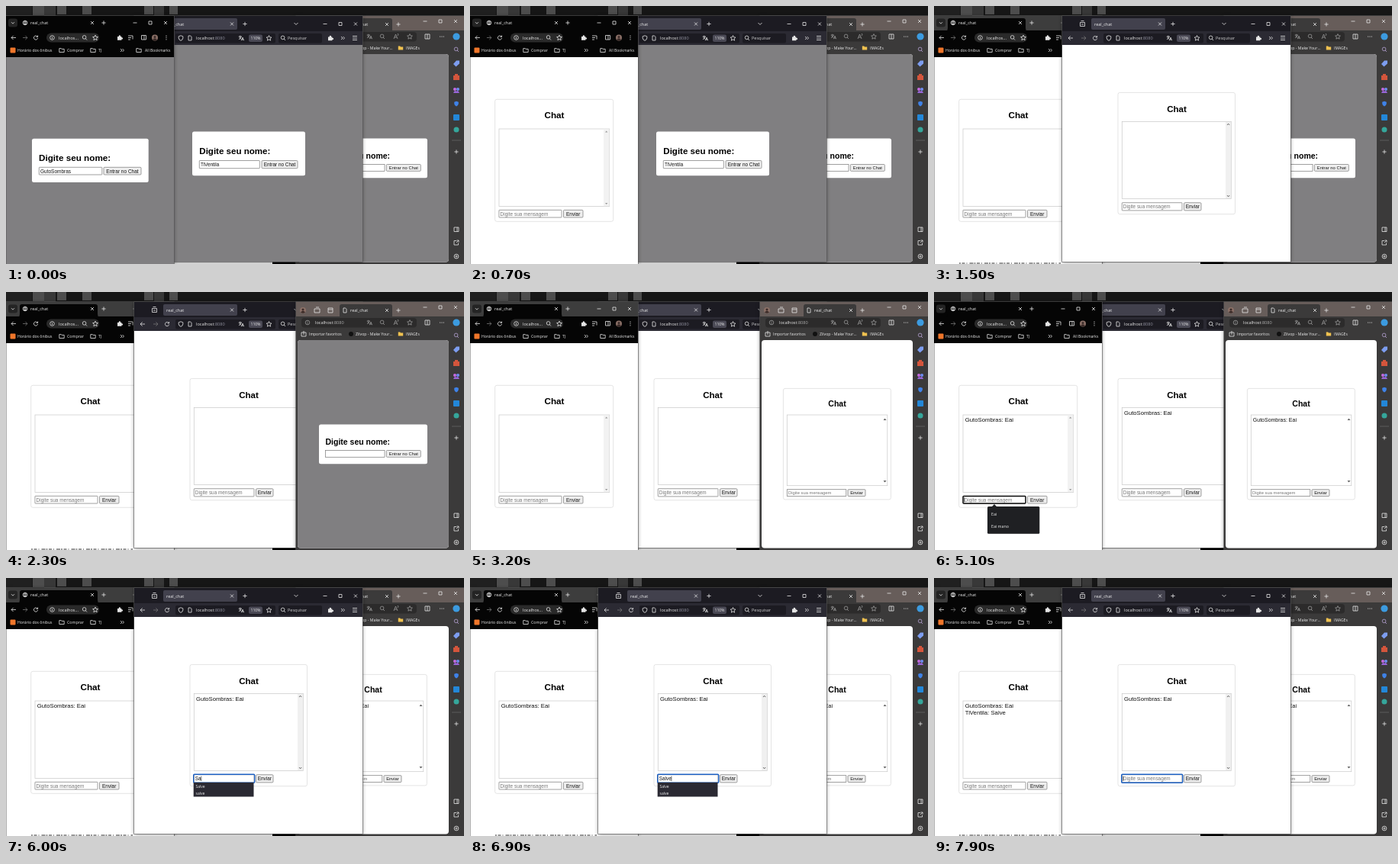
An HTML page for the animation above (8 s loop, 600x338 px).

```html
<!DOCTYPE html>
<html lang="pt-BR">
<head>
<meta charset="utf-8">
<title>real_chat</title>
<style>
html, body { margin: 0; width: 100%; height: 100%; overflow: hidden; background: #161616; }
svg { position: absolute; display: block; }
text { font: 5.3px "Open Sans", "Noto Sans", sans-serif; fill: #eee; white-space: pre; }

/* moving parts share one clock */
.win, .t { animation: 8s step-end -30ms infinite; }
.win { box-shadow: 0 0 0 .6px #555, 0 1px 5px rgba(0, 0, 0, .45); }
#chrome { animation-name: z-chrome; }
#firefox { animation-name: z-firefox; }
#edge { animation-name: z-edge; }

.i { fill: none; stroke: #e6e6e6; stroke-width: .8; }
.dim { stroke: #9a9a9a; }
.page text { font-family: "Liberation Sans", Arial, sans-serif; fill: #111; }
.page .h { font-weight: bold; fill: #000; }
.page .ph { fill: #777; }
.page .mid { text-anchor: middle; }
.card { fill: #fff; stroke: #d9d9d9; stroke-width: .7; }
.box { fill: #fff; stroke: #c8c8c8; stroke-width: .7; }
.in { fill: #fff; stroke: #777; stroke-width: .7; }
.btn { fill: #efefef; stroke: #777; stroke-width: .7; }
.ring { fill: none; stroke: #111; stroke-width: 1.4; }
.veil { fill: #807f81; }
.page .menu text { font: 5.3px "Open Sans", "Noto Sans", sans-serif; fill: #eee; }

#chrome .h { font-size: 11.7px; }  #chrome .m { font-size: 7.75px; }  #chrome .f { font-size: 6.5px; }
#firefox .h { font-size: 11.55px; } #firefox .m { font-size: 7.65px; } #firefox .f { font-size: 6.4px; }
#edge .h { font-size: 10.5px; }    #edge .m { font-size: 7px; }       #edge .f { font-size: 5.83px; }

@keyframes z-chrome  { 0% { z-index: 3 } 12.5% { z-index: 2 } 22.5% { z-index: 1 } 38.75% { z-index: 3 } 68.75% { z-index: 2 } }
@keyframes z-firefox { 0% { z-index: 2 } 12.5% { z-index: 3 } 22.5% { z-index: 2 } 38.75% { z-index: 1 } 68.75% { z-index: 3 } }
@keyframes z-edge    { 0% { z-index: 1 } 22.5% { z-index: 3 } 38.75% { z-index: 2 } 68.75% { z-index: 1 } }

@keyframes idle   { 0% { opacity: 0 } 12.5% { opacity: 1 } 42.5% { opacity: 0 } 68.75% { opacity: 1 } }
@keyframes behind { 0% { opacity: 0 } 12.5% { opacity: 1 } 38.75% { opacity: 0 } 68.75% { opacity: 1 } }
@keyframes join1  { 0% { opacity: 1 } 8.75% { opacity: 0 } }
@keyframes join2  { 0% { opacity: 1 } 17.5% { opacity: 0 } }
@keyframes join3  { 0% { opacity: 1 } 30% { opacity: 0 } }
@keyframes msg1   { 0% { opacity: 0 } 56.25% { opacity: 1 } }
@keyframes msg2   { 0% { opacity: 0 } 98.75% { opacity: 1 } }

@keyframes focus1 { 0% { opacity: 0 } 47.5% { opacity: 1 } 68.75% { opacity: 0 } }
@keyframes hint1  { 0% { opacity: 1 } 50% { opacity: 0 } 56.25% { opacity: 1 } }
@keyframes eai1   { 0% { opacity: 0 } 50% { opacity: 1 } 56.25% { opacity: 0 } }
@keyframes eai2   { 0% { opacity: 0 } 51.25% { opacity: 1 } 56.25% { opacity: 0 } }
@keyframes eai3   { 0% { opacity: 0 } 53.75% { opacity: 1 } 56.25% { opacity: 0 } }
@keyframes caret1 { 0% { transform: none } 50% { transform: translateX(4.4px) } 51.25% { transform: translateX(8px) }
                    53.75% { transform: translateX(9.4px) } 56.25% { transform: none } }

@keyframes focus2 { 0% { opacity: 0 } 71.25% { opacity: 1 } }
@keyframes hint2  { 0% { opacity: 1 } 73.75% { opacity: 0 } 98.75% { opacity: 1 } }
@keyframes typed2 { 0% { opacity: 0 } 73.75% { opacity: 1 } 98.75% { opacity: 0 } }
@keyframes sal2   { 0% { opacity: 0 } 75% { opacity: 1 } }
@keyframes sal3   { 0% { opacity: 0 } 78.75% { opacity: 1 } }
@keyframes sal4   { 0% { opacity: 0 } 81.25% { opacity: 1 } }
@keyframes sal5   { 0% { opacity: 0 } 85% { opacity: 1 } }
@keyframes caret2 { 0% { transform: none } 73.75% { transform: translateX(4.3px) } 75% { transform: translateX(7.8px) }
                    78.75% { transform: translateX(9.3px) } 81.25% { transform: translateX(12.4px) }
                    85% { transform: translateX(16px) } 98.75% { transform: none } }
</style>
</head>
<body>

<!-- desktop and shared icons -->
<svg width="600" height="338" viewBox="0 0 600 338">
  <defs>
    <path id="x" d="M-2-2 2 2M2-2-2 2"/>
    <path id="plus" d="M-2.6 0H2.6M0-2.6V2.6"/>
    <path id="ctl" d="M-2.5 0H2.5M18-2H22V2H18ZM38-2 42 2M42-2 38 2"/>
    <path id="back" d="M3 0H-3M-.4-2.6-3 0-.4 2.6"/>
    <path id="fwd" d="M-3 0H3M.4-2.6 3 0 .4 2.6"/>
    <path id="load" d="M2.3-1.2A2.6 2.6 0 1 0 2.6 .5M2.6-3V-1H.6"/>
    <path id="star" d="M0-3.4 1-1.1 3.4-.9 1.6 .8 2.1 3.2 0 1.9-2.1 3.2-1.6 .8-3.4-.9-1-1.1Z"/>
    <path id="lens" d="M1.9-.6A2.3 2.3 0 1 1-2.7-.6 2.3 2.3 0 1 1 1.9-.6ZM1.2 1.1 3 3"/>
    <path id="doc" d="M-2-3H.7L2-1.6V3H-2Z"/>
    <path id="info" d="M2.8 0A2.8 2.8 0 1 1-2.8 0 2.8 2.8 0 1 1 2.8 0ZM0-.4V1.6M0-1.7V-1"/>
    <path id="more" d="M-.6 0A.6 .6 0 1 1 .6 0 .6 .6 0 1 1-.6 0M-.6-2.3A.6 .6 0 1 1 .6-2.3 .6 .6 0 1 1-.6-2.3M-.6 2.3A.6 .6 0 1 1 .6 2.3 .6 .6 0 1 1-.6 2.3"/>
    <path id="puzzle" d="M-3-1.6H-1.2A1.2 1.2 0 1 1 1-1.6H2.4V0A1.1 1.1 0 1 1 2.4 1.8V3.2H-3Z"/>
    <path id="folder" d="M-3.2-2.4H-.8L0-1.6H3.2V2.5H-3.2Z"/>
    <path id="shield" d="M0-3.2 2.8-2.2V0Q2.6 2.4 0 3.4-2.6 2.4-2.8 0V-2.2Z"/>
    <g id="face"><circle r="4" fill="#8a6f66"/><circle cy="-.9" r="1.5" fill="#3a2b28"/><path d="M-3 2.6Q0-1 3 2.6Q0 5 -3 2.6Z" fill="#3a2b28"/></g>
    <g id="lang"><path d="M-3.2-2H.8M-1.2-3.2V-2M.2-2Q-.6 .8-3 1.8M-2.4-1.4Q-1.4 .6 .2 1.4M.4 3.2 2 -.8 3.6 3.2M1 2H3"/></g>
  </defs>
  <path fill="#161616" d="M0 0H600V338H0Z"/>
  <path fill="#202020" d="M0 0H34V13H0Z"/>
  <path fill="#4d4d4d" d="M35 0H50V12H35ZM67 0H79V11H67ZM100 0H112V11H100ZM181 0H193V11H181ZM214 0H225V11H214Z"/>
  <path fill="#383838" d="M50 0H65V13H50ZM194 0H207V13H194Z"/>
  <path fill="#f4f4f4" d="M0 334H349V338H0Z"/>
  <path fill="#000" d="M349 334H380V338H349Z"/>
</svg>

<svg id="edge" class="win" style="left:380px;top:13px" width="220" height="325" viewBox="380 13 220 325">
  <path fill="#3b3a3a" d="M380 13H600V338H380Z"/>
  <path fill="#675d5a" d="M380 13H600V32H380Z"/>
  <path fill="#3b3a3a" d="M437 32V19Q437 16 440 16H503Q506 16 506 19V32Z"/>
  <use href="#face" x="389" y="24"/>
  <g class="i">
    <path d="M404 22H411V27H404ZM406 20H410M422 21H428V27H422ZM422 23H428"/>
    <use href="#doc" x="444" y="24"/>
    <use href="#x" x="499" y="24"/><use href="#plus" x="514" y="24"/><use href="#ctl" x="549" y="20"/>
  </g>
  <text x="451" y="26" style="font-size:5.5px">real_chat</text>
  <rect x="387" y="34" width="151" height="12.5" rx="4" fill="#2c2b2b"/>
  <g class="i dim">
    <use href="#info" x="395" y="40"/><use href="#lang" x="476" y="40"/><use href="#lens" x="493" y="40"/>
    <path d="M508 43 510.5 37 513 43M509 41H512M513 36Q515 37 513 39"/>
    <use href="#star" x="529" y="40"/>
  </g>
  <text x="405" y="42" style="font-size:5.6px">localhost<tspan fill="#aaa">:8080</tspan></text>
  <path class="i" d="M549 37H555V43H549ZM552 37V43"/>
  <use href="#more" fill="#eee" transform="translate(571 40) rotate(90)"/>
  <circle cx="590" cy="40" r="4.6" fill="#3c9be0"/>
  <path class="i" d="M387 53H393V58H387ZM390 51V56"/>
  <text x="397" y="57" style="font-size:5px">Importar favoritos</text>
  <circle cx="452" cy="55" r="3" fill="#111"/>
  <text x="458" y="57" style="font-size:5.2px">Zilvop - Make Your...</text>
  <use href="#folder" x="517" y="55" fill="#f0c250"/>
  <text x="524" y="57" style="font-size:5px">IMAGEs</text>

  <g class="i">
    <use href="#lens" x="590" y="57" stroke="#b9a5d8"/><path d="M584 176H596" stroke="#666"/>
    <use href="#plus" x="590" y="191"/>
    <path d="M587 290H593V295.500H587ZM591 290V295.500M590 307.500H587V313H592.500V310.500M590 310 593 307M590.500 307H593V309.500"/>
    <circle cx="590" cy="328" r="2.900"/><circle cx="590" cy="328" r="1"/>
  </g>
  <path fill="#7d9df0" d="M586 76 590 71.500H594V75.500L589.500 79.500Z"/>
  <path fill="#d4553c" d="M586 91H594V97H586ZM588 89H592V91H588Z"/>
  <circle cx="588" cy="109" r="2" fill="#c46be0"/><circle cx="592" cy="109" r="2" fill="#6c8cf0"/><path fill="#9966d8" d="M586 114Q588 109 590 112Q592 109 594 114Z"/>
  <use href="#shield" x="590" y="128" fill="#3f82e8"/>
  <rect x="586" y="142" width="8" height="8" rx="1" fill="#2387d8"/>
  <circle cx="590" cy="162" r="3.5" fill="#35a69b"/>

  <g class="page">
    <rect x="382" y="63" width="198" height="272.500" rx="4" fill="#fff"/>
    <rect class="card" x="410.400" y="126.400" width="141" height="145.500" rx="2.500"/>
    <text class="h mid" x="481" y="150">Chat</text>
    <rect class="box" x="415.300" y="161" width="131.500" height="92.700"/>
    <path fill="#666" d="M541.500 168 543.500 165.500 545.500 168ZM541.500 247 543.500 249.500 545.500 247Z"/>
    <text class="m t" x="417.800" y="169.600" style="animation-name:msg1">GutoSombras: Eai</text>
    <rect class="in" x="415.300" y="258.700" width="77.500" height="8.800"/>
    <text class="f ph" x="417" y="265.200">Digite sua mensagem</text>
    <rect class="btn" x="495" y="258.700" width="23" height="8.800" rx="1"/>
    <text class="f mid" x="506.500" y="265.200">Enviar</text>
    <g class="t" style="animation-name:join3">
      <rect class="veil" x="382" y="63" width="198" height="272.500" rx="4"/>
      <rect x="410" y="173.500" width="142" height="51.700" rx="2.500" fill="#fff"/>
      <text class="h" x="418.500" y="200">Digite seu nome:</text>
      <rect class="in" x="418.500" y="207.500" width="77.500" height="8.800"/>
      <rect class="btn" x="498.300" y="207.500" width="45" height="8.800" rx="1"/>
      <text class="f mid" x="520.800" y="214">Entrar no Chat</text>
    </g>
  </g>
</svg>

<svg id="firefox" class="win" style="left:168px;top:13px" width="299" height="322" viewBox="168 13 299 322">
  <path fill="#1c1b22" d="M168 13H467V33H168Z"/>
  <path fill="#2b2a33" d="M168 33H467V51H168Z"/>
  <rect x="206" y="16" width="97" height="15" rx="2" fill="#42414d"/>
  <text x="210" y="25.500" style="font-size:5.500px">real_chat</text>
  <g class="i">
    <path d="M191.500 21.500H197.500V26.500H191.500ZM192.500 19.500H196.500M193 24H196"/>
    <use href="#x" x="296" y="23.500"/><use href="#plus" x="313" y="23.500"/><path d="M377.500 22 380 24.500 382.500 22"/>
    <use href="#ctl" x="418" y="23.500"/>
    <use href="#back" x="179" y="42"/><use href="#fwd" x="196" y="42" stroke="#777"/><use href="#load" x="211" y="42"/>
  </g>
  <rect x="222" y="36" width="131" height="12.500" rx="2" fill="#1c1b22"/>
  <rect x="357" y="36" width="57" height="12.500" rx="2" fill="#1c1b22"/>
  <rect x="318" y="37.500" width="18" height="9.500" rx="2" fill="#4a4955"/>
  <g class="i">
    <use href="#shield" x="229" y="42"/><use href="#doc" x="241" y="42"/><use href="#lang" x="308" y="42"/>
    <use href="#star" x="344.500" y="42"/><use href="#lens" x="363" y="42"/>
    <path d="M439 40 441 42 439 44M441.500 40 443.500 42 441.500 44M454 39.500H460M454 42H460M454 44.500H460"/>
  </g>
  <use href="#puzzle" x="425" y="42" fill="#e6e6e6"/>
  <text x="249" y="44.200" style="font-size:5.600px">localhost<tspan fill="#8f8f9d">:8080</tspan></text>
  <text x="320.500" y="44" style="font-size:5.100px">110%</text>
  <text x="369" y="44.200" fill-opacity=".85" style="font-size:5.500px">Pesquisar</text>

  <g class="page">
    <path fill="#fff" d="M168 51H467V335H168Z"/>
    <rect class="card" x="241" y="113.400" width="153.500" height="159.300" rx="2.500"/>
    <text class="h mid" x="318" y="138.500">Chat</text>
    <rect class="box" x="246.300" y="151.500" width="143.300" height="101"/>
    <path fill="#f0f0f0" d="M382 152H389.200V252H382Z"/>
    <path class="i" style="stroke:#444" d="M384 156 385.600 154.200 387.200 156M384 248 385.600 249.800 387.200 248"/>
    <text class="m t" x="249" y="161" style="animation-name:msg1">GutoSombras: Eai</text>
    <rect class="in" x="246.300" y="257.700" width="78.700" height="10.200" rx=".5"/>
    <text class="f ph t" x="247.800" y="265.200" style="animation-name:hint2">Digite sua mensagem</text>
    <rect class="btn" x="327.500" y="257.700" width="22.500" height="10.200" rx="1.200"/>
    <text class="f mid" x="338.800" y="265.200">Enviar</text>
    <g class="t" style="animation-name:focus2">
      <rect class="ring" style="stroke:#1f62c4" x="245.700" y="257.300" width="80" height="11" rx="1"/>
      <path class="t" style="animation-name:caret2" d="M247.900 259.500V266" stroke="#000" stroke-width=".6"/>
    </g>
    <g class="t" style="animation-name:typed2">
      <g class="f">
        <text class="f" x="247.800" y="265.200">S</text>
        <text class="f t" x="252.070" y="265.200" style="animation-name:sal2">a</text>
        <text class="f t" x="255.630" y="265.200" style="animation-name:sal3">l</text>
        <text class="f t" x="257.050" y="265.200" style="animation-name:sal4">v</text>
        <text class="f t" x="260.250" y="265.200" style="animation-name:sal5">e</text>
      </g>
      <g class="menu">
        <path fill="#2b2a33" d="M245.700 268H324.500V286.500H245.700Z"/>
        <text x="248.500" y="275" style="font-size:5px">Salve</text>
        <text x="248.500" y="284" style="font-size:5px">salve</text>
      </g>
    </g>
    <g class="t" style="animation-name:join2">
      <path class="veil" d="M168 51H467V335H168Z"/>
      <rect x="244" y="164.500" width="148" height="57.700" rx="2.500" fill="#fff"/>
      <text class="h" x="253.300" y="194">Digite seu nome:</text>
      <rect class="in" x="253.300" y="202.500" width="79" height="10.200" rx=".5"/>
      <text class="f" x="255" y="210">TiVentila</text>
      <rect class="btn" x="335" y="202.500" width="47" height="10.200" rx="1.200"/>
      <text class="f mid" x="358.500" y="210">Entrar no Chat</text>
    </g>
  </g>
</svg>

<svg id="chrome" class="win" style="left:0;top:13px" width="220" height="325" viewBox="0 13 220 325">
  <path fill="#050505" d="M0 13H220V67H0Z"/>
  <path class="t" style="animation-name:idle" fill="#3d3d3d" d="M0 13H220V32H0Z"/>
  <path fill="#050505" d="M16 33Q18 32 18 29V19Q18 16 21 16H117Q120 16 120 19V29Q120 32 122 33Z"/>
  <rect x="3" y="16.500" width="12" height="11" rx="3" fill="#242424"/>
  <g class="i">
    <path d="M7 21.200 9 23.200 11 21.200"/>
    <circle cx="25" cy="22" r="2.800"/><path d="M22.500 21H27.500M23 23.500H27M25 19V25"/>
    <use href="#x" x="113" y="22"/><use href="#plus" x="128" y="22"/><use href="#ctl" x="169" y="22"/>
    <use href="#back" x="10" y="41.500"/><use href="#fwd" x="25" y="41.500" stroke="#777"/><use href="#load" x="39" y="41.500"/>
  </g>
  <text x="32" y="24.200" style="font-size:5.500px">real_chat</text>
  <rect x="53" y="35.500" width="69" height="12" rx="6" fill="#2a2a2a"/>
  <g class="i">
    <use href="#info" x="60.500" y="41.500"/><use href="#lens" x="103" y="41.500"/><use href="#star" x="117" y="41.500"/>
    <path d="M160 39H166M160 41.500H164M160 44H163M166 39V43.500M177.500 38.500H183.500V44H177.500ZM181 38.500V44"/>
  </g>
  <use href="#puzzle" x="149" y="41.500" fill="#e6e6e6"/>
  <use href="#face" x="195" y="41.500"/>
  <use href="#more" x="210" y="41.500" fill="#eee"/>
  <text x="69" y="43.700" style="font-size:5.600px">localhos...</text>
  <rect x="5.500" y="54.500" width="7" height="7" rx="1" fill="#f0762a"/>
  <text x="15" y="60" style="font-size:5.100px">Horário dos ônibus</text>
  <g class="i">
    <use href="#folder" x="73" y="58"/><use href="#folder" x="114" y="58"/><use href="#folder" x="174" y="58"/>
    <path d="M150 56 152 58 150 60M152.500 56 154.500 58 152.500 60"/>
  </g>
  <text x="80" y="60">Comprar</text>
  <text x="121" y="60">TJ</text>
  <text x="182" y="60" style="font-size:5px">All Bookmarks</text>

  <g class="page">
    <path fill="#fff" d="M0 67H220V338H0Z"/>
    <path class="t" style="animation-name:behind" d="M33 337H166" stroke="#777" stroke-width="1.600" stroke-dasharray="2 1.500 4 2 1 3 5 1"/>
    <rect class="card" x="32.700" y="122.300" width="155" height="160" rx="2.500"/>
    <text class="h mid" x="110.500" y="147.300">Chat</text>
    <rect class="box" x="38" y="161" width="144.700" height="101.500"/>
    <path fill="#f2f2f2" d="M175 161.400H182.300V262.100H175Z"/>
    <path fill="#999" d="M177 165.500 178.700 163.500 180.400 165.500ZM177 258 178.700 260 180.400 258Z"/>
    <text class="m t" x="40.700" y="170" style="animation-name:msg1">GutoSombras: Eai</text>
    <text class="m t" x="40.700" y="179.200" style="animation-name:msg2">TiVentila: Salve</text>
    <rect class="in" x="38" y="267.300" width="82" height="9.700" rx=".5"/>
    <text class="f ph t" x="39.500" y="274.500" style="animation-name:hint1">Digite sua mensagem</text>
    <rect class="btn" x="122.500" y="267.300" width="25.500" height="9.700" rx="1"/>
    <text class="f mid" x="135.200" y="274.500">Enviar</text>
    <text class="f t" x="39.500" y="274.500" style="animation-name:eai1">E</text>
    <text class="f t" x="43.830" y="274.500" style="animation-name:eai2">a</text>
    <text class="f t" x="47.450" y="274.500" style="animation-name:eai3">i</text>
    <g class="t" style="animation-name:focus1">
      <rect class="ring" x="38" y="267.500" width="82" height="9.500" rx="1"/>
      <path class="t" style="animation-name:caret1" d="M39.600 269V275.500" stroke="#000" stroke-width=".6"/>
      <g class="menu">
        <path fill="#1f2023" d="M75.500 281.500 79 278 82.500 281.500Z"/>
        <rect x="70" y="281" width="68.300" height="35.700" rx="1.500" fill="#1f2023"/>
        <text x="75" y="293">Eai</text>
        <text x="75" y="309">Eai mano</text>
      </g>
    </g>
    <g class="t" style="animation-name:join1">
      <path class="veil" d="M0 67H220V338H0Z"/>
      <rect x="34" y="173.700" width="152.700" height="57.300" rx="2.500" fill="#fff"/>
      <text class="h" x="43" y="203">Digite seu nome:</text>
      <rect class="in" x="43.300" y="211.300" width="82.500" height="9.700" rx=".5"/>
      <text class="f" x="45" y="218.500">GutoSombras</text>
      <rect class="btn" x="128" y="211.300" width="49" height="9.700" rx="1"/>
      <text class="f mid" x="152.500" y="218.500">Entrar no Chat</text>
    </g>
  </g>
  <path d="M.3 67V338" stroke="#555" stroke-width=".6"/>
</svg>

</body>
</html>
```
